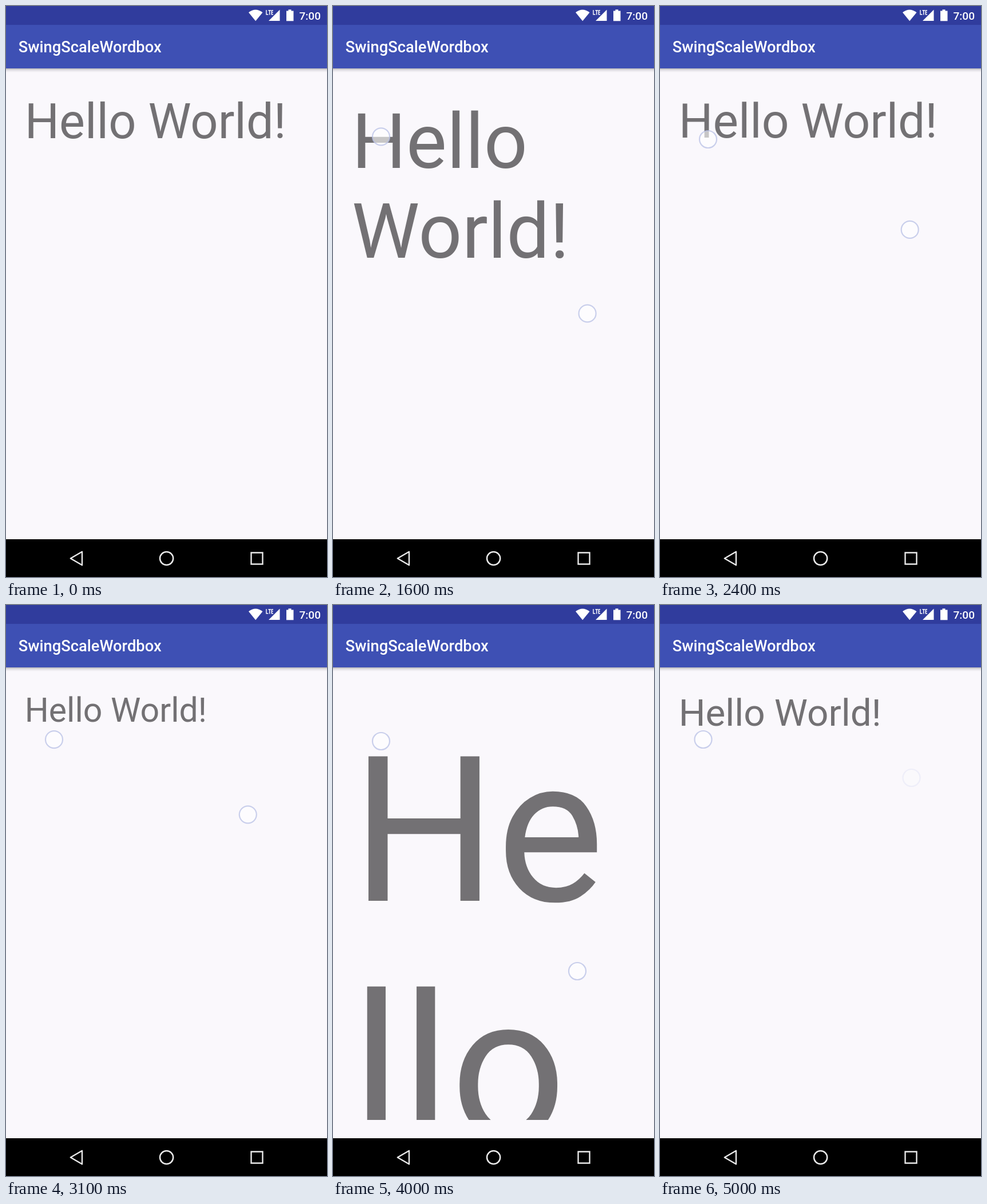
These frames come from a looping animation (561x998 px, 5.1 s). An HTML page with a canvas:

```html
<!DOCTYPE html>
<html lang="en">
<head>
<meta charset="utf-8">
<title>Pinch to zoom text</title>
<style>
  html, body { margin: 0; width: 100%; height: 100%; overflow: hidden; }
  canvas { display: block; }
</style>
</head>
<body>
<canvas id="stage" width="561" height="998"></canvas>
<script>
const ctx = document.getElementById('stage').getContext('2d');
const LOOP = 5100, STEP = 100;
const WIDTH = 561, HEIGHT = 998, BAR_BOTTOM = 109, NAV_TOP = 932;
const PAD = 32.7, BODY_TOP = 141.8, BODY_BOTTOM = 900, LINE_WIDTH = WIDTH - 2 * PAD;
const ASCENT = 1.0566, LINE_HEIGHT = 1.172;
const MESSAGE = 'Hello World!';

// Turning points of the two pinches; power shapes the move that leads to each one.
const zoom = [
  { at: 1200, to: [84.7] },
  { at: 1900, to: [265.8], power: 0.6 },
  { at: 2950, to: [38.3], power: 1.4 },
  { at: 4000, to: [355], power: 1.4 },
  { at: 4700, to: [65.6], power: 3.7 }
].map(key => ({ ...key, to: key.to.map(Math.log) }));

const thumb = [
  { at: 1000, to: [84, 225] },
  { at: 2400, to: [84, 233] },
  { at: 4000, to: [84, 238] },
  { at: 4700, to: [84, 238] },
  { at: 5000, to: [75.5, 235] }
];

const finger = [
  { at: 1200, to: [434, 390] },
  { at: 1900, to: [452.5, 648] },
  { at: 3000, to: [430, 282], power: 2 },
  { at: 3600, to: [398, 656.5], power: 1.4 },
  { at: 4000, to: [427, 640] },
  { at: 4700, to: [439.5, 302], power: 2 }
];

const clamp = value => Math.min(1, Math.max(0, value));

function tween(keys, time) {
  let values = keys[0].to;
  for (let i = 1; i < keys.length; i++) {
    const { at, to, power = 1 } = keys[i];
    const k = clamp((time - keys[i - 1].at) / (at - keys[i - 1].at));
    const eased = 1 - (1 - k) ** power;
    values = values.map((value, n) => value + (to[n] - value) * eased);
  }
  return values;
}

// Balanced line breaking: as few breaks inside words as possible, then even lines.
function wrap(text) {
  const end = text.length;
  const best = [];
  best[end] = { cost: 0, lines: [] };
  for (let i = end - 1; i >= 0; i--) {
    best[i] = { cost: Infinity, lines: [] };
    for (let j = i + 1; j <= end; j++) {
      if (text[j] === ' ') continue;
      const line = text.slice(i, j).trimEnd();
      const slack = LINE_WIDTH - ctx.measureText(line).width;
      if (slack < 0) break;
      const split = j < end && text[j - 1] !== ' ' ? 1e9 : 0;
      const cost = best[j].cost + split + (j < end ? slack * slack : 0);
      if (cost < best[i].cost) best[i] = { cost, lines: [line, ...best[j].lines] };
    }
  }
  return best[0].lines;
}

function rect(color, x, y, w, h) {
  ctx.fillStyle = color;
  ctx.fillRect(x, y, w, h);
}

function setFont(size, weight) {
  ctx.font = `${weight} ${size}px Roboto, sans-serif`;
}

function strokePath(data, color, width) {
  ctx.strokeStyle = color;
  ctx.lineWidth = width;
  ctx.stroke(new Path2D(data));
}

function drawMessage(size) {
  ctx.save();
  ctx.beginPath();
  ctx.rect(0, BAR_BOTTOM, WIDTH, BODY_BOTTOM - BAR_BOTTOM);
  ctx.clip();
  setFont(size, 400);
  ctx.fillStyle = '#737174';
  wrap(MESSAGE).forEach((line, i) => {
    ctx.fillText(line, PAD, BODY_TOP + size * (ASCENT + LINE_HEIGHT * i));
  });
  ctx.restore();
}

function drawTopBars() {
  const shadow = ctx.createLinearGradient(0, BAR_BOTTOM, 0, BAR_BOTTOM + 7);
  shadow.addColorStop(0, 'rgba(0,0,0,.28)');
  shadow.addColorStop(0.4, 'rgba(0,0,0,.1)');
  shadow.addColorStop(1, 'rgba(0,0,0,0)');
  rect(shadow, 0, BAR_BOTTOM, WIDTH, 7);
  rect('#303c9d', 0, 0, WIDTH, 33);
  rect('#3e50b4', 0, 33, WIDTH, BAR_BOTTOM - 33);

  ctx.fillStyle = '#fff';
  setFont(27.3, 500);
  ctx.fillText('SwingScaleWordbox', 21.8, 81);
  setFont(19.1, 500);
  ctx.fillText('7:00', 512.4, 24);

  // Wi-Fi, signal, battery, network type
  ctx.fill(new Path2D('M424 11.3Q436 1.7 448.5 11.3L436.2 26.3Z'));
  ctx.fill(new Path2D('M478.5 6.5V26H459Z'));
  ctx.fill(new Path2D('M490 8.5H493.5V6.3H498.5V8.5H502.5V26.3H490Z'));
  strokePath('M455 7V14.7H458.4 M458.4 7.7H463 M460.7 7.7V15.4 M467 7.7H464.3V14.7H467 M464.3 11.1H466.7', '#fff', 1.4);
}

function drawNavBar() {
  const color = '#e9e9e9';
  rect('#000', 0, NAV_TOP, WIDTH, HEIGHT - NAV_TOP);
  ctx.lineJoin = 'round';
  strokePath('M112.8 965.5L133 953.8V977.2Z', color, 2.4);
  ctx.lineJoin = 'miter';
  strokePath('M428.5 955.5H448.5V975.5H428.5Z', color, 2.4);
  strokePath('M269 965.5a11.6 11.6 0 1 0 23.2 0a11.6 11.6 0 1 0 -23.2 0', color, 2.5);
}

function drawTouch([x, y], opacity) {
  ctx.globalAlpha = clamp(opacity);
  ctx.beginPath();
  ctx.arc(x, y, 15, 0, 2 * Math.PI);
  ctx.fillStyle = 'rgba(255,255,255,.6)';
  ctx.fill();
  ctx.strokeStyle = 'rgba(184,192,230,.75)';
  ctx.lineWidth = 2.2;
  ctx.stroke();
  ctx.globalAlpha = 1;
}

const start = performance.now();

function draw() {
  const elapsed = (performance.now() - start) % LOOP;
  const time = Math.floor(elapsed / STEP) * STEP;
  rect('#faf8fc', 0, 0, WIDTH, HEIGHT);
  drawMessage(Math.exp(tween(zoom, time)[0]));
  drawTopBars();
  drawNavBar();
  drawTouch(tween(thumb, time), (time - 800) / 100);
  drawTouch(tween(finger, time), Math.min(time - 1000, 5025 - time) / 100);
  requestAnimationFrame(draw);
}

draw();
</script>
</body>
</html>
```
